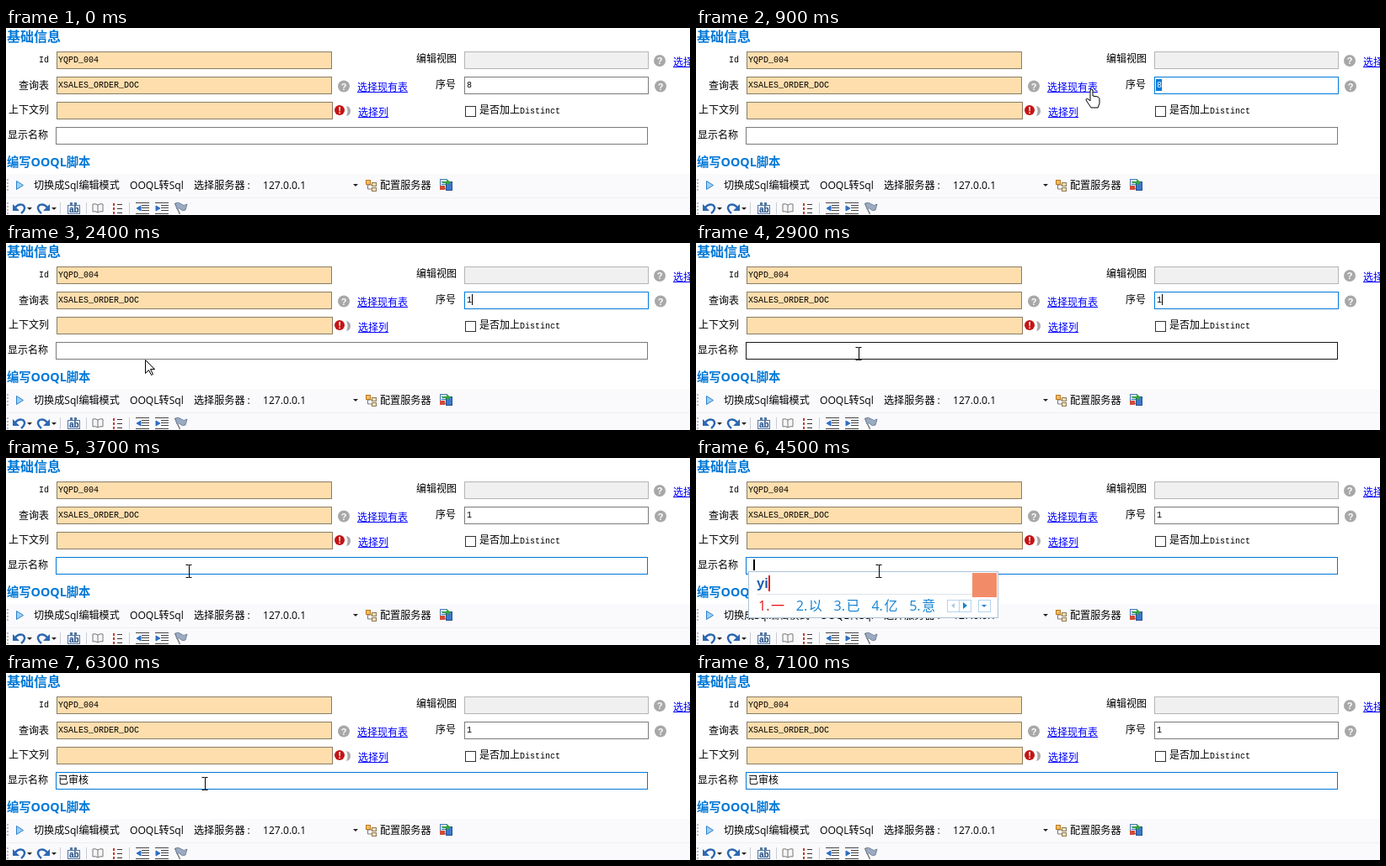
Recreate the animation shown at these times as an HTML page with a canvas. Size 812 by 223 pixels, loop 7.2 s.

```html
<!DOCTYPE html>
<html lang="zh">
<head>
<meta charset="utf-8">
<style>
html, body { margin: 0; width: 100%; height: 100%; overflow: hidden; background: #fff; }
canvas { display: block; }
</style>
</head>
<body>
<canvas id="stage" width="812" height="223"></canvas>
<script>
const ctx = document.getElementById('stage').getContext('2d');
const LOOP = 7200;
const CJK = '"Noto Sans CJK SC", "Noto Sans CJK", sans-serif';
const LABEL = '12px ' + CJK;
const MONO = '10px "Liberation Mono", monospace';
const UI = '12.1px "Open Sans", ' + CJK;
const BLUE = '#0078d7', LINK = '#0000ff', PEACH = '#ffdead';

const fields = {
  id: [60, 28, 326, 20, PEACH],
  table: [60, 58, 326, 20, PEACH],
  column: [60, 88, 327, 20, PEACH],
  view: [544, 28, 218, 20, '#f0f0f0'],
  order: [544, 58, 218, 20, '#fff'],
  name: [59, 118, 702, 20, '#fff']
};
const links = [['选择现有表', 417, 75], ['选择列', 418, 105], ['选择', 792, 45]];

// Pointer way points: time, x, y
const route = [
  [100, 800, 57], [300, 700, 60], [400, 600, 68], [800, 471, 71], [900, 469, 73],
  [1100, 469, 73], [1200, 469, 74], [1300, 469, 74], [1800, 192, 134], [2000, 192, 134],
  [2100, 192, 137], [2200, 184, 139], [2400, 165, 139], [2500, 165, 139], [2800, 193, 131],
  [3300, 193, 131], [3700, 217, 134], [6200, 217, 134], [6300, 236, 131], [6400, 238, 124],
  [6600, 340, 42], [6800, 750, 42]
];

// Input method steps: time, typed letters, candidates, right edge
const typing = [
  [4100, 'y', '一 有 与 要 用', 358],
  [4500, 'yi', '一 以 已 亿 意', 358],
  [4600, "yi's", '一生 意识 医生 以上 一身', 438],
  [4700, "yi'sh", '一时 意识 医生 艺术家 一上午', 478],
  [4800, "yi'she", '一社 一设 以射 医社 一舍', 438],
  [5000, "yi'shen", '一身 一审 以身 翼神 一伸', 438],
  [5300, "yi'shen'h", '已审核 一审核 以审核 一身 一伸', 481],
  [5600, "yi'shen'he", '已审核 一身 一审 以身 翼神', 454]
];

function text(s, x, y, font = LABEL, color = '#000') {
  ctx.font = font;
  ctx.fillStyle = color;
  ctx.fillText(s, x, y);
  return x + ctx.measureText(s).width;
}
function rect(x, y, w, h, color) {
  ctx.fillStyle = color;
  ctx.fillRect(x, y, w, h);
}
function box(x, y, w, h, fill, stroke) {
  rect(x, y, w, h, fill);
  ctx.lineWidth = 1;
  ctx.strokeStyle = stroke;
  ctx.strokeRect(x + .5, y + .5, w, h);
}
function path(d, fill, stroke, x = 0, y = 0, width = 1) {
  const shape = new Path2D(d);
  ctx.save();
  ctx.translate(x, y);
  if (fill) { ctx.fillStyle = fill; ctx.fill(shape); }
  if (stroke) { ctx.strokeStyle = stroke; ctx.lineWidth = width; ctx.stroke(shape); }
  ctx.restore();
}
function badge(x, y, r, color, mark) {
  ctx.beginPath();
  ctx.arc(x, y, r, 0, 7);
  ctx.fillStyle = color;
  ctx.fill();
  ctx.textAlign = 'center';
  text(mark, x, y + 4, 'bold 11px "Liberation Sans", sans-serif', '#fff');
  ctx.textAlign = 'left';
}
const dropArrow = (x, y, color = '#222') => path('M0 0h6l-3 3z', color, null, x, y);
const during = (t, from, to) => t >= from && t < to;

function pointerAt(t) {
  if (!during(t, 100, 6900)) return null;
  const i = route.findIndex(p => p[0] > t);
  if (i < 0) return route[route.length - 1].slice(1);
  const [t0, x0, y0] = route[i - 1], [t1, x1, y1] = route[i];
  const k = (t - t0) / (t1 - t0);
  return [Math.round(x0 + (x1 - x0) * k), Math.round(y0 + (y1 - y0) * k)];
}
function fieldAt([x, y]) {
  return Object.keys(fields).find(key => {
    const [fx, fy, w, h] = fields[key];
    return x >= fx && x <= fx + w && y >= fy && y <= fy + h;
  });
}

function drawForm(t, hover) {
  const focus = during(t, 400, 3300) ? 'order' : t >= 3300 ? 'name' : '';
  for (const [key, [x, y, w, h, fill]] of Object.entries(fields)) {
    const idle = key === 'view' ? '#b4b4b4' : fill === PEACH ? '#8c7b62' : '#7a7a7a';
    const border = key === focus ? BLUE : key === hover && key !== 'view' ? '#171717' : idle;
    box(x, y, w, h, fill, border);
  }
  text('基础信息', 1, 16, 'bold 16px ' + CJK, BLUE);
  text('Id', 39, 41, MONO);
  text('查询表', 15, 73);
  text('上下文列', 3, 102);
  text('显示名称', 2, 132);
  text('编辑视图', 487, 41);
  text('序号', 510, 72);
  text('YQPD_004', 62, 41, MONO);
  text('XSALES_ORDER_DOC', 62, 71, MONO);
  for (const [s, x, y] of links) {
    const end = text(s, x, y, LABEL, LINK);
    rect(x, y + 1, end - x, 1, LINK);
  }
  box(545, 93, 12, 12, '#fff', '#333');
  text('是否加上', 562, 102);
  text('Distinct', 610, 102, MONO);
  badge(401, 69.5, 7, '#a8a8a8', '?');
  badge(776, 39, 7, '#a8a8a8', '?');
  badge(777, 69.5, 7, '#a8a8a8', '?');
  badge(396, 98, 6, '#c41414', '!');
  path('M404 93q5 1 5 6t-5 6q3-6 0-12z', '#a8a8a8');

  const selected = during(t, 600, 1600);
  if (selected) rect(546, 61, 7, 14, BLUE);
  text(t < 1600 ? '8' : '1', 547, 71, MONO, selected ? '#fff' : '#000');
  if (during(t, 1600, 3300)) rect(553, 61, 1, 13, '#000');

  if (t >= 5800) text('已审核', 62, 132);
  if (during(t, 3400, 3700)) rect(62, 121, 1, 13, '#000');
  if (during(t, 4500, 4800) || during(t, 5000, 5300)) rect(68, 121, 2, 13, '#000');
  if (during(t, 6600, 7100)) rect(98, 121, 1, 12, '#000');
}

function drawToolbar() {
  text('编写OOQL脚本', 1, 165, 'bold 14.3px "Open Sans", ' + CJK, BLUE);
  rect(0, 174, 812, 49, '#fafafc');
  rect(0, 202, 812, 1, '#f0f0f3');
  for (let y = 180; y < 223; y += 4) if (y < 196 || y > 206) rect(1, y, 2, 2, '#b8bcc6');

  path('M12.5 182.5v10l8-5z', '#9fd0f6', '#2a80cc');
  text('切换成Sql编辑模式', 33, 192, UI);
  text('OOQL转Sql', 147, 192, UI);
  text('选择服务器 :', 223, 192, UI);
  text('127.0.0.1', 305, 192, UI);
  dropArrow(412, 186);
  path('M429.5 186v6h5M429.5 187h5', null, '#777');
  box(427, 181, 5, 5, '#f5bd62', '#b9771d');
  box(434, 184, 5, 4, '#f3dfb4', '#8c7a58');
  box(434, 190, 5, 4, '#f3dfb4', '#8c7a58');
  text('配置服务器', 444, 192, UI);
  box(515, 180, 8, 11, '#d8e7f8', '#4d79b5');
  rect(517, 183, 5, 1, '#4d79b5');
  rect(517, 186, 5, 1, '#4d79b5');
  box(522, 183, 7, 10, '#3a78cc', '#23508f');
  path('M518 183h5v-3l5 4-5 4v-3h-5z', '#35a53c');
  rect(515, 188, 6, 5, '#d24b35');

  const swoosh = 'M3 6Q7 1 12 3Q17 7 10 13', head = 'M0 2v8h8z';
  const turn = () => {
    path(swoosh, null, '#2d68b2', 8, 208, 2.4);
    path(head, '#2d68b2', null, 8, 208);
  };
  turn();
  dropArrow(25, 214);
  ctx.save();
  ctx.translate(60, 0);
  ctx.scale(-1, 1);
  turn();
  ctx.restore();
  dropArrow(54, 214);
  for (const x of [64, 95, 146]) rect(x, 208, 1, 14, '#c8ccd4');

  box(73, 211, 14, 10, '#e6eef8', '#55779f');
  path('M76 211v-3h3v3M81 211v-3h3v3', '#55779f');
  text('ab', 75, 220, 'bold 10px "Liberation Sans", sans-serif', '#244c80');
  path('M109 211q-3-2-6-1v9q3-1 6 1q3-2 6-1v-9q-3-1-6 1v9', '#f6f6f6', '#777');
  for (let i = 0; i < 3; i++) {
    rect(127, 209 + i * 5, 2, 3, '#c53a28');
    rect(132, 210 + i * 5, 6, 1, '#333');
  }
  for (const [x, d] of [[154, 'M6 5L1 8l5 3z'], [177, 'M1 5l5 3-5 3z']]) {
    rect(x, 208, 16, 1, '#444');
    rect(x, 221, 16, 1, '#444');
    for (let y = 211; y < 220; y += 3) rect(x + 7, y, 9, 1, '#444');
    path(d, '#2d6fc4', '#2d6fc4', x, 207);
  }
  path('M200.5 209l6 13', null, '#777', 0, 0, 1.5);
  path('M201 209q4-2 7 1t7 0l-2 7q-4 2-6-1t-4 0z', '#9aabc2', '#71839d');
}

function drawInputMethod(t) {
  if (!during(t, 4100, 5800)) return;
  const [, letters, list, right] = typing.filter(s => s[0] <= t).pop();
  box(62, 135, right - 62, 55, '#fff', '#a9c3dc');
  const end = text(letters, 72, 155, 'bold 16.5px "Liberation Sans", sans-serif', '#1c5fae');
  rect(Math.round(end), 140, 2, 19, '#e81818');
  rect(72, 162, right - 102, 1, '#dde3ea');
  let x = 74;
  list.split(' ').forEach((word, i) => {
    const color = i ? '#1583d3' : '#e3141c';
    text(`${i + 1}.`, x, 182, '16px "Open Sans", sans-serif', color);
    text(word, x + 15, 182, '16px ' + CJK, color);
    x += 28.8 + 16 * word.length;
  });
  for (const dx of [60, 46, 23]) box(right - dx, 169, 14, 14, '#fff', '#b5d3ec');
  path('M0 0v6l-4-3z', '#a9c9e4', null, right - 51, 173);
  path('M0 0v8l5-4z', '#1583d3', null, right - 41, 172);
  dropArrow(right - 19, 175, '#1583d3');
  rect(right - 30, 137, 29, 29, '#f28c68');
}

function drawPointer(t, pos, hover) {
  const [x, y] = pos;
  const onLink = x >= 417 && x <= 477 && y >= 64 && y <= 77;
  if (hover || during(t, 400, 900)) {
    path('M-3.5-6.5h3l.5.5.5-.5h3M.5-6V8M-3.5 8.5h3l.5-.5.5.5h3', null, '#000', x, y);
  } else if (onLink) {
    path('M-1 1q2-2 3 0v7l6 1q2 1 2 3v5l-2 5h-8l-6-9q0-3 3-1l2 2z', '#fff', '#000', x, y);
  } else {
    path('M.5.5v16l4-4 3 6 2-1-3-6h5z', '#fff', '#000', x, y);
  }
}

function frame(now) {
  const t = Math.floor(now % LOOP / 100) * 100;
  const pos = pointerAt(t);
  const hover = pos && fieldAt(pos);
  rect(0, 0, 812, 223, '#fff');
  drawForm(t, hover);
  drawToolbar();
  drawInputMethod(t);
  if (pos) drawPointer(t, pos, hover);
  requestAnimationFrame(() => frame(performance.now() - start));
}
const start = performance.now();
frame(0);
</script>
</body>
</html>
```
